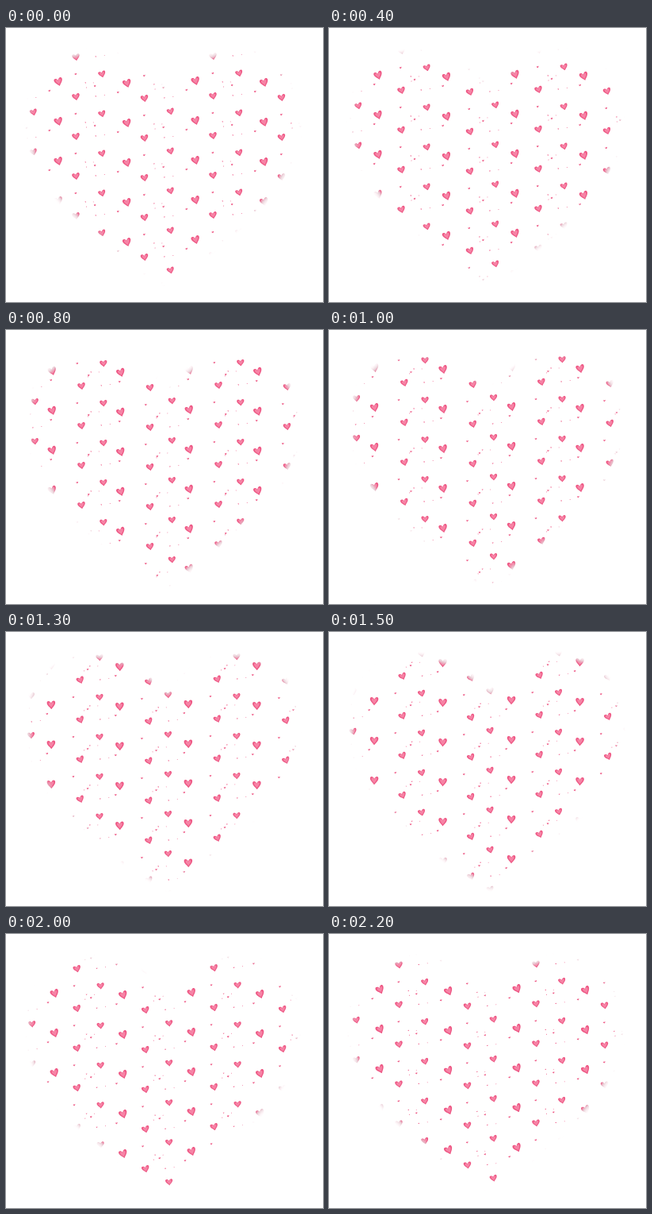
An HTML page with a canvas that plays this animation: 400 px wide and 345 px high, repeating every 2300 ms.

```html
<!DOCTYPE html>
<html lang="en">
<head>
<meta charset="utf-8">
<title>Heart of rising hearts</title>
<style>
  html, body { margin: 0; width: 100%; height: 100%; overflow: hidden; background: #fff; }
  canvas { display: block; }
</style>
</head>
<body>
<canvas id="stage" width="400" height="345"></canvas>
<script>
const W = 400, H = 345, STEPS = 23, STEP_MS = 100;
const COLUMN = 86.5, ROW = 50;
const ctx = document.getElementById('stage').getContext('2d');

const heart = new Path2D('M0 .52C-.14 .3-.47 .1-.48-.18C-.46-.46-.14-.44 0-.14C.14-.46 .46-.48 .48-.2C.47 .1 .14 .3 0 .52Z');
const outline = new Path2D('M204 76C184 62 166 36 118 30C80 27 32 50 27 110C25 170 60 210 90 239' +
  'C125 271 165 303 205 323C250 286 300 247 325 220C350 190 370 160 369 115' +
  'C367 55 325 29 290 29C245 31 222 60 204 76Z');

// Sideways drift and tilt in degrees at these steps of the loop
const keys = [0, 4, 8, 13, 17, 20, 22];
const sways = {
  a: { x: [66.2, 62, 58.3, 57, 57.8, 61.3, 64.4], tilt: [-16, -17, -17, -3, 0, -17, -24] },
  b: { x: [88.3, 91.4, 95.3, 93.8, 91.4, 89.6, 88.3], tilt: [-10, -16, -10, -20, -20, -14, -10] },
  c: { x: [34.6, 37, 36.5, 31.6, 30.1, 32.8, 34.5], tilt: [-14, -14, -6, -5, -20, -6, -12] }
};

// sway, x offset, starting y, width, height
const kinds = [
  ['a', 0, 67.3, 11, 11.6],
  ['b', 0, 36.3, 10, 9.6],
  ['c', 0, 105.8, 9.6, 9],
  ['c', 53.3, 58, 2.8, 2.4],
  ['c', 20.2, 79, 2.8, 2.4],
  ['a', 46, 73, 2.6, 2.4],
  ['b', 12, 69, 1.7, 1.6],
  ['b', 25, 86, 1.8, 1.6],
  ['b', 36, 84.5, 1.2, 1],
  ['b', 22, 69, 1.1, 1],
  ['c', 67, 75, 1.2, 1.2]
];

const mod = (n, m) => ((n % m) + m) % m;

// Smooth periodic curve through the key values
function curve(values, t) {
  const n = keys.length;
  const time = i => keys[mod(i, n)] + Math.floor(i / n) * STEPS;
  const value = i => values[mod(i, n)];
  const slope = i => (value(i + 1) - value(i - 1)) / (time(i + 1) - time(i - 1));
  let i = 0;
  while (time(i + 1) <= t) i++;
  const span = time(i + 1) - time(i), u = (t - time(i)) / span, v = 1 - u;
  return value(i) * (1 + 2 * u) * v * v + value(i + 1) * (3 - 2 * u) * u * u +
    span * u * v * (slope(i) * v - slope(i + 1) * u);
}

function layer(paint) {
  const canvas = document.createElement('canvas');
  canvas.width = W;
  canvas.height = H;
  paint(canvas.getContext('2d'));
  return canvas;
}

const mask = layer(c => {
  c.filter = 'blur(2px)';
  c.fill(outline);
});

const rim = layer(c => {
  c.filter = 'blur(2px)';
  c.strokeStyle = '#dcd6d8';
  c.lineWidth = 5;
  c.stroke(outline);
});

function drawHeart(x, y, w, h, angle) {
  ctx.save();
  ctx.translate(x, y);
  ctx.rotate(angle);
  ctx.scale(w, h);
  ctx.fillStyle = '#ee5784';
  ctx.fill(heart);
  if (w > 5) {
    // Paler middle inside the darker edge
    ctx.scale(0.66, 0.66);
    ctx.fillStyle = '#f683a5';
    ctx.fill(heart);
  }
  ctx.restore();
}

function drawKind([name, dx, y0, w, h], t) {
  const sway = sways[name];
  const x0 = curve(sway.x, t) + dx;
  const angle = curve(sway.tilt, t) * Math.PI / 180;
  const rise = 2 * t + 0.4 * Math.max(0, t - 13);
  for (let col = -2; col < 5; col++) {
    const shift = mod(col, 2) * 2 - Math.floor(col / 2);
    for (let y = mod(y0 + shift - rise, ROW); y < H; y += ROW) {
      drawHeart(x0 + col * COLUMN, y, w, h, angle);
    }
  }
}

function overlay(mode, image) {
  ctx.globalCompositeOperation = mode;
  ctx.drawImage(image, 0, 0);
}

function draw(t) {
  ctx.globalCompositeOperation = 'source-over';
  ctx.clearRect(0, 0, W, H);
  kinds.forEach(kind => drawKind(kind, t));
  overlay('source-atop', rim);
  overlay('destination-in', mask);
}

const start = performance.now();
let shown = -1;
function tick() {
  const t = Math.floor((performance.now() - start) / STEP_MS) % STEPS;
  if (t !== shown) draw(shown = t);
  requestAnimationFrame(tick);
}
tick();
</script>
</body>
</html>
```
